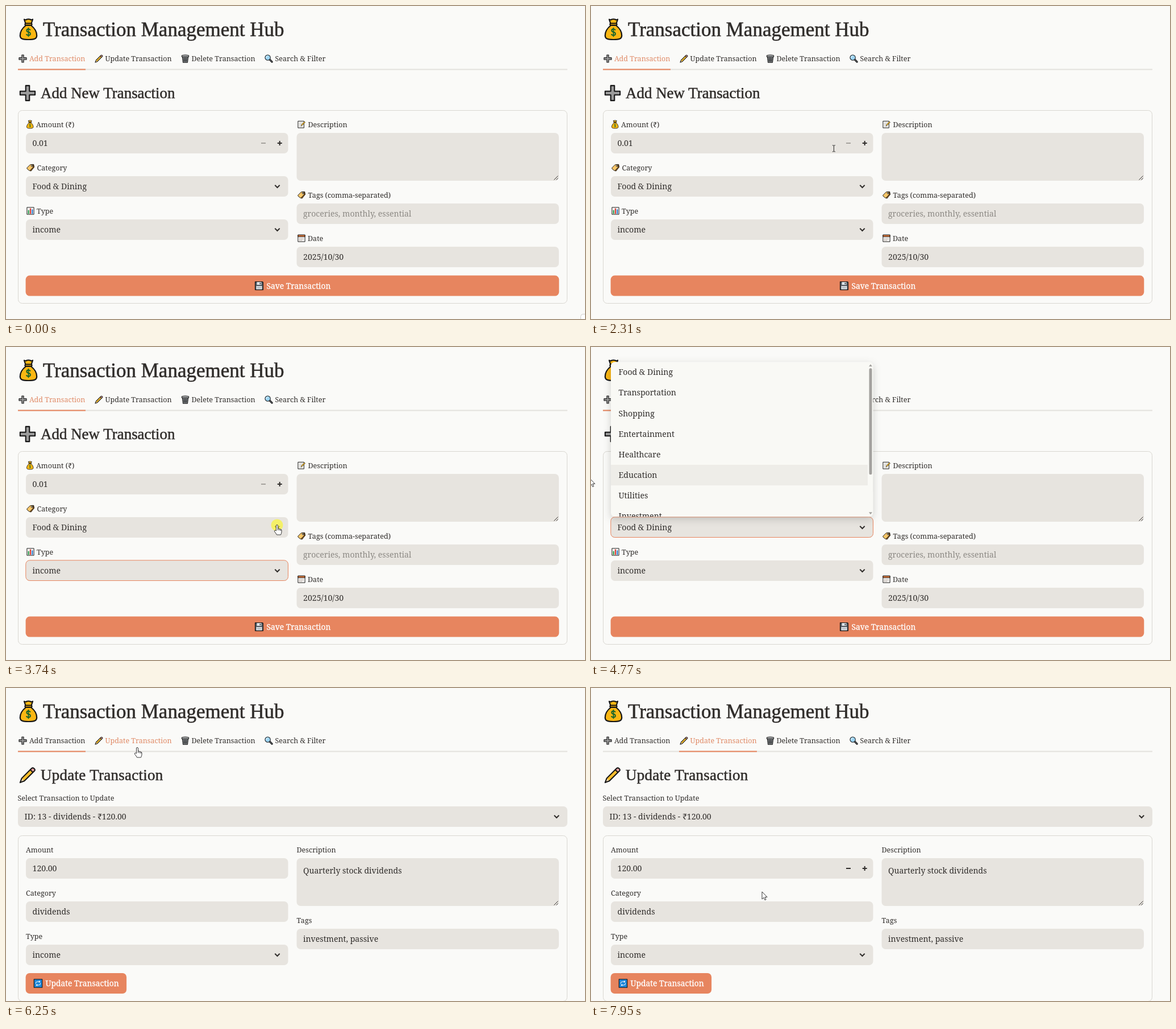
These frames come from a looping animation (1019 px wide and 550 px high, 8 s). An HTML page:

```html
<!DOCTYPE html>
<html lang="en">
<head>
<meta charset="utf-8">
<title>Transaction Management Hub</title>
<style>
  html, body { margin: 0; width: 100%; height: 100%; overflow: hidden; background: #fafaf8; }
  svg { display: block; }
  #stage { width: 100%; height: 100%; cursor: default; }
  text { font-family: "Noto Serif", serif; fill: #302d2b; white-space: pre; }
  .label { font-size: 12.55px; }
  .value { font-size: 14.1px; }
  .hint { fill: #8c8984; }
  .light { font-size: 13.85px; fill: #fff; stroke: #fff; stroke-width: .3px; }
  .head { font-family: "Liberation Serif", serif; stroke: #302d2b; }
  .h1 { font-size: 35px; stroke-width: .6px; }
  .h2 { font-size: 26.95px; stroke-width: .5px; }
  .box { fill: #e7e4df; }
  .form { fill: none; stroke: #d9d7d1; }
  .button { fill: #e7855f; }
  .dark { fill: none; stroke: #302d2b; stroke-width: 2; }
  .focus { fill: none; stroke: #e7855f; }
  .menu { filter: drop-shadow(0 4px 7px rgba(40, 38, 34, .2)); }
  .active { fill: #e08a66; }
  symbol { overflow: visible; }
  .ink { stroke: #151515; stroke-width: 2.2; stroke-linejoin: round; }
</style>
</head>
<body>
<svg id="stage" viewBox="0 0 1019 550">
  <defs>
    <symbol id="bag" viewBox="0 0 32 38">
      <g class="ink" fill="#fbb713">
        <path d="M11.500 12C5 17 1.300 24 1.300 30C1.500 35.500 5 37 16 37S30.500 35.500 30.700 30C30.700 24 27 17 20.500 12Z"/>
        <path d="M8.500 1.500Q11 3 13 1.500Q16 .5 19 1.500Q21 3 23.500 1.500L21 9H11Z"/>
        <rect x="10" y="8.500" width="12" height="3.400" rx="1.700"/>
      </g>
      <path d="M19.500 20.500Q18.500 18.500 16 18.500Q12.800 18.500 12.800 21Q12.800 23.200 16 23.800Q19.500 24.500 19.500 27Q19.500 29.500 16 29.500Q13 29.500 12.300 27.300M16 16V32" fill="none" stroke="#17642c" stroke-width="1.900"/>
    </symbol>
    <symbol id="plus" viewBox="0 0 32 32">
      <path class="ink" fill="#9b9b9b" d="M12.500 2h7v10.500H30v7H19.500V30h-7V19.500H2v-7h10.500z"/>
    </symbol>
    <symbol id="pencil" viewBox="0 0 32 32">
      <path fill="#f7bd2b" d="M5 22L23.500 3.500Q26 1.500 28.500 4T28.500 8.500L10 27L2 30Z"/>
      <path fill="#e9a3a3" d="M21.500 5.500L23.500 3.500Q26 1.500 28.500 4T28.500 8.500L26.500 10.500Z"/>
      <path fill="#f5dcb2" d="M5 22L10 27L2 30Z"/>
      <path class="ink" fill="none" d="M5 22L23.500 3.500Q26 1.500 28.500 4T28.500 8.500L10 27L2 30ZM21 6L26 11"/>
    </symbol>
    <symbol id="bin" viewBox="0 0 32 32">
      <path class="ink" fill="#85888b" d="M5 9H27L24.500 30.500H7.500Z"/>
      <path class="ink" fill="#b5b8ba" d="M3 4Q16 0 29 4V9H3Z"/>
      <path stroke="#303234" stroke-width="1.800" fill="none" d="M11 12L12 28M16 12V28M21 12L20 28M8 17H24M8 23H24"/>
    </symbol>
    <symbol id="lens" viewBox="0 0 32 32">
      <path stroke="#151515" stroke-width="7" stroke-linecap="round" d="M19 19L28 28"/>
      <path stroke="#62666b" stroke-width="3" stroke-linecap="round" d="M20 20L28 28"/>
      <circle class="ink" cx="12" cy="12" r="10" fill="#9bd4f6"/>
      <path d="M6.500 13Q6.500 7 12 6" fill="none" stroke="#fff" stroke-width="2"/>
    </symbol>
    <symbol id="memo" viewBox="0 0 32 32">
      <path class="ink" fill="#f7f6f3" d="M2 3H26V30H2Z"/>
      <path d="M6 9H20M6 14H16M6 19H13M6 25H21" stroke="#a5a5a5" stroke-width="1.500"/>
      <path fill="#f7bd2b" stroke="#151515" stroke-width="1.500" d="M16 17L27.500 4.500L31 7.500L19 20L14.500 22Z"/>
    </symbol>
    <symbol id="tag" viewBox="0 0 32 32">
      <path class="ink" fill="#a86a20" d="M20 5L29 3L31 14L18 30L13 27Z"/>
      <path class="ink" fill="#fbc768" d="M2 17L15 4L26 3L27 14L14 28Q12 29 10 27L2 20Z"/>
      <circle class="ink" cx="21.500" cy="9" r="2.800" fill="#fff"/>
    </symbol>
    <symbol id="chart" viewBox="0 0 32 32">
      <path class="ink" fill="#f6f6f4" d="M2 2H30V30H2Z"/>
      <path fill="#2f9e4f" d="M6 13h5v15H6z"/>
      <path fill="#d9392f" d="M13.500 6h5v22h-5z"/>
      <path fill="#2c7fd0" d="M21 10h5v18h-5z"/>
    </symbol>
    <symbol id="date" viewBox="0 0 32 32">
      <path class="ink" fill="#f6f4f1" d="M2 3H30V30H2Z"/>
      <path class="ink" fill="#e9803f" d="M2 3H30V10H2Z"/>
      <path d="M7 16H25M7 20.500H25M7 25H19" stroke="#b4aaa4" stroke-width="2.800" stroke-dasharray="4 2.500"/>
    </symbol>
    <symbol id="disk" viewBox="0 0 32 32">
      <path class="ink" fill="#50565d" d="M2 2H28L30 4V30H2Z"/>
      <path fill="#dfe4e8" d="M8 3H24V13H8ZM6 17H26V29H6Z"/>
      <path d="M9 21H23M9 25H23" stroke="#8f979e" stroke-width="1.600"/>
      <path fill="#50565d" d="M18 5H22V11H18Z"/>
    </symbol>
    <symbol id="sync" viewBox="0 0 32 32">
      <rect class="ink" x="1.500" y="1.500" width="29" height="29" fill="#1c86d9"/>
      <path d="M8 17V15Q8 10 14 10H20M24 15V17Q24 22 18 22H12" fill="none" stroke="#fff" stroke-width="2"/>
      <path d="M19 6L24 10L19 14ZM13 18L8 22L13 26Z" fill="#fff"/>
    </symbol>
  </defs>
</svg>
<script>
const stage = document.getElementById('stage');
const zones = [];
let page = 'any';

const zone = (x, y, w, h, kind) => zones.push({ page, x, y, w, h, kind });
const text = (x, y, str, cls, extra = '') => `<text x="${x}" y="${y}" class="${cls}" ${extra}>${str}</text>`;
const rect = (x, y, w, h, cls) => `<rect x="${x}" y="${y}" width="${w}" height="${h}" rx="7" class="${cls}"/>`;
const icon = (id, x, y, w, h = w) => `<use href="#${id}" x="${x}" y="${y}" width="${w}" height="${h}"/>`;

// y is the vertical middle of the label line
function label(x, y, str, id, gap = 18) {
  if (!id) return text(x, y + 4.5, str, 'label');
  const pic = id === 'bag' ? icon(id, x + 1, y - 7.500, 12.500, 15) : icon(id, x + 1, y - 7, 14);
  return pic + text(x + gap, y + 4.5, str, 'label');
}

function field(x, y, w, str, { h = 36, mid = 18, cls = '', kind = 'beam' } = {}) {
  zone(x, y, w, h, kind);
  return rect(x, y, w, h, 'box') + text(x + 11.5, y + mid + 4.9, str, 'value ' + cls);
}

function select(x, y, w, str) {
  const cx = x + w - 19, cy = y + 18;
  return field(x, y, w, str, { kind: 'hand' }) +
    `<path class="dark" d="M${cx - 4.2} ${cy - 2.200}l4.200 4.200 4.200-4.200"/>`;
}

function area(x, y, str) {
  return field(x, y, 461.500, str, { h: 84, mid: 22 }) +
    `<path class="dark" style="stroke-width:1" d="M${x + 453} ${y + 82.500}l7-7M${x + 457} ${y + 82.500}l3-3"/>`;
}

function stepper(y, off) {
  zone(438, y - 18, 59, 36, 'hand');
  return `<path class="dark" d="M449 ${y}h8" ${off ? 'style="stroke:#a5a29d"' : ''}/>` +
    `<path class="dark" d="M477.700 ${y}h8M481.700 ${y - 4}v8"/>`;
}

function button(x, y, w, str, id, ix) {
  zone(x, y, w, 36, 'hand');
  return rect(x, y, w, 36, 'button') + icon(id, ix, y + 10, 16) + text(ix + 21, y + 22.900, str, 'light');
}

function menu(id, y, h, names, extra = '') {
  const rows = names.map((n, i) => text(13.500, 23 + i * 36.150, n, 'value')).join('');
  return `<g id="${id}"><g class="menu">${rect(35, y, 461.500, h, 'paper')}</g>
    <svg x="35" y="${y}" width="461.500" height="${h}">
      <rect class="row" width="${extra ? 452 : 461.500}" height="36.150" fill="#eeede8"/>${rows}${extra}
    </svg></g>`;
}

const tabs = [
  { x: 21, w: 119, id: 'plus', name: 'Add Transaction', tx: 41 },
  { x: 155, w: 137, id: 'pencil', name: 'Update Transaction', tx: 174.500 },
  { x: 307, w: 132, id: 'bin', name: 'Delete Transaction', tx: 326.500 },
  { x: 454, w: 109, id: 'lens', name: 'Search &amp; Filter', tx: 473.500 }
];

let html = icon('bag', 23.500, 22, 32, 38) + text(65, 53, 'Transaction Management Hub', 'head h1');
for (const tab of tabs) {
  zone(tab.x, 78, tab.w, 36, 'hand');
  html += icon(tab.id, tab.x + 1, 85, 15) + text(tab.tx, 97, tab.name, 'label tab');
}
html += '<path d="M21 111.500H988" stroke="#e4e2de" stroke-width="2"/>' +
  '<rect id="line" y="110.500" height="2" fill="#e7855f"/>';

page = 'add';
html += '<g id="add">' + icon('plus', 23, 138, 30) + text(61, 162, 'Add New Transaction', 'head h2') +
  rect(21.500, 183.500, 966, 339, 'form') +
  label(35, 208, 'Amount (₹)', 'bag') + field(35, 223, 461.500, '0.01') + stepper(241, true) +
  label(35, 284, 'Category', 'tag', 19.500) + select(35, 299, 461.500, 'Food &amp; Dining') +
  label(35, 360, 'Type', 'chart', 19) + select(35, 375, 461.500, 'income') +
  label(512, 208, 'Description', 'memo', 19.500) + area(511.500, 223, '') +
  label(512, 332, 'Tags (comma-separated)', 'tag', 19.500) +
  field(511.500, 347, 461.500, 'groceries, monthly, essential', { cls: 'hint' }) +
  label(512, 408, 'Date', 'date', 19) + field(511.500, 423, 461.500, '2025/10/30') +
  button(34.600, 473.600, 938.700, 'Save Transaction', 'disk', 437.500) + '</g>';

page = 'update';
html += '<g id="update">' + icon('pencil', 23, 138, 30) +
  text(61, 162, 'Update Transaction', 'head h2', 'letter-spacing=".3"') +
  label(20.500, 193.500, 'Select Transaction to Update') + select(21, 208, 967, 'ID: 13 - dividends - ₹120.00') +
  rect(21.500, 259.500, 966, 291, 'form') +
  label(35, 284, 'Amount') + field(35, 299, 461.500, '120.00') + `<g id="steps">${stepper(317)}</g>` +
  label(35, 360, 'Category') + field(35, 375, 461.500, 'dividends') +
  label(35, 436, 'Type') + select(35, 451, 461.500, 'income') +
  label(511.500, 284, 'Description') + area(511.500, 299, 'Quarterly stock dividends') +
  label(511.500, 408, 'Tags') + field(511.500, 423, 461.500, 'investment, passive') +
  button(34.600, 501, 177.500, 'Update Transaction', 'sync', 48.500) + '</g>';

const scrollbar = `<rect x="454.500" y="11" width="5" height="187" rx="2.500" fill="#a3a19e"/>
  <path d="M454 8l3-4 3 4zM454 264l3 4 3-4z" fill="#a3a19e"/>`;
html += '<rect id="focus" x="34.800" width="461.700" height="35.700" rx="7" class="focus"/>' +
  menu('types', 411, 72.300, ['income', 'expense']) +
  menu('kinds', 26.300, 272, ['Food &amp; Dining', 'Transportation', 'Shopping', 'Entertainment',
    'Healthcare', 'Education', 'Utilities', 'Investment'], scrollbar) +
  `<rect id="corner" x="1011.500" y="541.500" width="24" height="24" rx="4" fill="#fff" stroke="#cfcecb"/>
  <g id="pointer">
    <circle id="halo" r="10.500" fill="#faf534" opacity=".7"/>
    <path id="arrow" d="M0 0V13L3 10.300L5 14.600L7 13.700L5 9.400H9Z" fill="#fff" stroke="#222" stroke-width=".9"/>
    <path id="hand" d="M-1.500 10V1A1.500 1.500 0 0 1 1.500 1V6Q3.500 5.200 4 6.800Q6 6 6.300 7.700Q8 7.200 8 9V12Q8 14 6.500 17H-.5Q-2 14-4.500 11.200Q-5 9-3.200 9ZM1.500 6V9M4 7V9.500M6.300 7.700V10" fill="#fff" stroke="#222" stroke-width=".9"/>
    <path id="beam" d="M-2.500-5.500H-.8L0-5L.8-5.500H2.500M0-5V5M-2.500 5.500H-.8L0 5L.8 5.500H2.500" fill="none" stroke="#222"/>
  </g>`;
stage.insertAdjacentHTML('beforeend', html);
document.querySelectorAll('.paper').forEach(p => p.setAttribute('fill', '#f9f9f5'));

// time, x, y of the pointer tip
const path = [
  [0, 1030, 560], [40, 1016, 546], [400, 560, 320], [820, 105, 108], [910, 53, 99],
  [1910, 53, 99], [2310, 427, 250], [2520, 506, 330], [2680, 473, 371],
  [2730, 473, 380], [2900, 468, 397], [3100, 469, 397], [3360, 499, 532], [3480, 499, 532],
  [3680, 477, 313], [4370, 477, 313], [4770, -2, 231], [4880, -14, 233],
  [5060, -12, 238], [5400, 10, 237], [5630, 10, 237], [5660, 33, 216], [5790, 304, 128],
  [5870, 232, 104], [6080, 231, 105], [6480, 231, 105], [6850, 313, 203],
  [7200, 746, 290], [7680, 474, 322], [7850, 256, 370], [7950, 301, 358], [8000, 301, 358]
];
const clicks = [[3040, 3180], [3390, 3490], [3690, 3825], [6080, 6210]];

const $ = id => document.getElementById(id);
const ramp = (t, a, b) => Math.min(1, Math.max(0, (t - a) / (b - a)));
const smooth = v => v * v * (3 - 2 * v);
const show = (id, on) => { $(id).style.display = on ? '' : 'none'; };
const fade = (id, v) => { $(id).style.opacity = v; show(id, v > 0); };
const within = (p, z) => p.x >= z.x && p.x < z.x + z.w && p.y >= z.y && p.y < z.y + z.h;

function pointAt(t) {
  const i = Math.max(1, path.findIndex(p => p[0] > t));
  const [a, x, y] = path[i - 1], [b, u, v] = path[i];
  const k = ramp(t, a, b);
  return { x: x + (u - x) * k, y: y + (v - y) * k };
}

function render(t) {
  const p = pointAt(t);
  const now = t < 6200 ? 'add' : 'update';
  const typesOpen = t >= 3120 && t < 3480;
  const kindsOpen = ramp(t, 3860, 4000) - ramp(t, 5080, 5260);

  show('add', now === 'add');
  show('update', now === 'update');
  show('steps', t >= 6350);
  show('corner', t < 60);
  show('types', typesOpen);
  fade('kinds', kindsOpen);

  show('focus', t >= 3060 && t < 5300);
  $('focus').setAttribute('y', t < 3850 ? 374.800 : 298.800);

  document.querySelector('#types .row').setAttribute('y', p.y > 447 ? 36.150 : 0);
  const row = p.x < 35 ? 5 : p.y < 298 ? Math.floor((p.y - 26.300) / 36.150) : 0;
  document.querySelector('#kinds .row').setAttribute('y', row * 36.150);

  const slide = smooth(ramp(t, 6270, 6450));
  $('line').setAttribute('x', 21 + 134 * slide);
  $('line').setAttribute('width', 119 + 18 * slide);
  document.querySelectorAll('.tab').forEach((el, i) => {
    const hover = within(p, { ...tabs[i], y: 78, h: 36 });
    el.classList.toggle('active', hover || i === (now === 'add' ? 0 : 1));
  });

  let kind = 'arrow';
  for (const z of zones) if ((z.page === now || z.page === 'any') && within(p, z)) kind = z.kind;
  if (typesOpen && within(p, { x: 35, y: 411, w: 461, h: 72 })) kind = 'hand';
  if (kindsOpen > 0 && within(p, { x: 35, y: 26, w: 461, h: 272 })) kind = 'hand';
  for (const k of ['arrow', 'hand', 'beam']) show(k, k === kind);
  show('halo', clicks.some(([a, b]) => t >= a && t < b));
  $('pointer').setAttribute('transform', `translate(${p.x} ${p.y})`);
}

function tick(time) {
  render(time % 8000);
  requestAnimationFrame(tick);
}
render(0);
requestAnimationFrame(tick);
</script>
</body>
</html>
```
